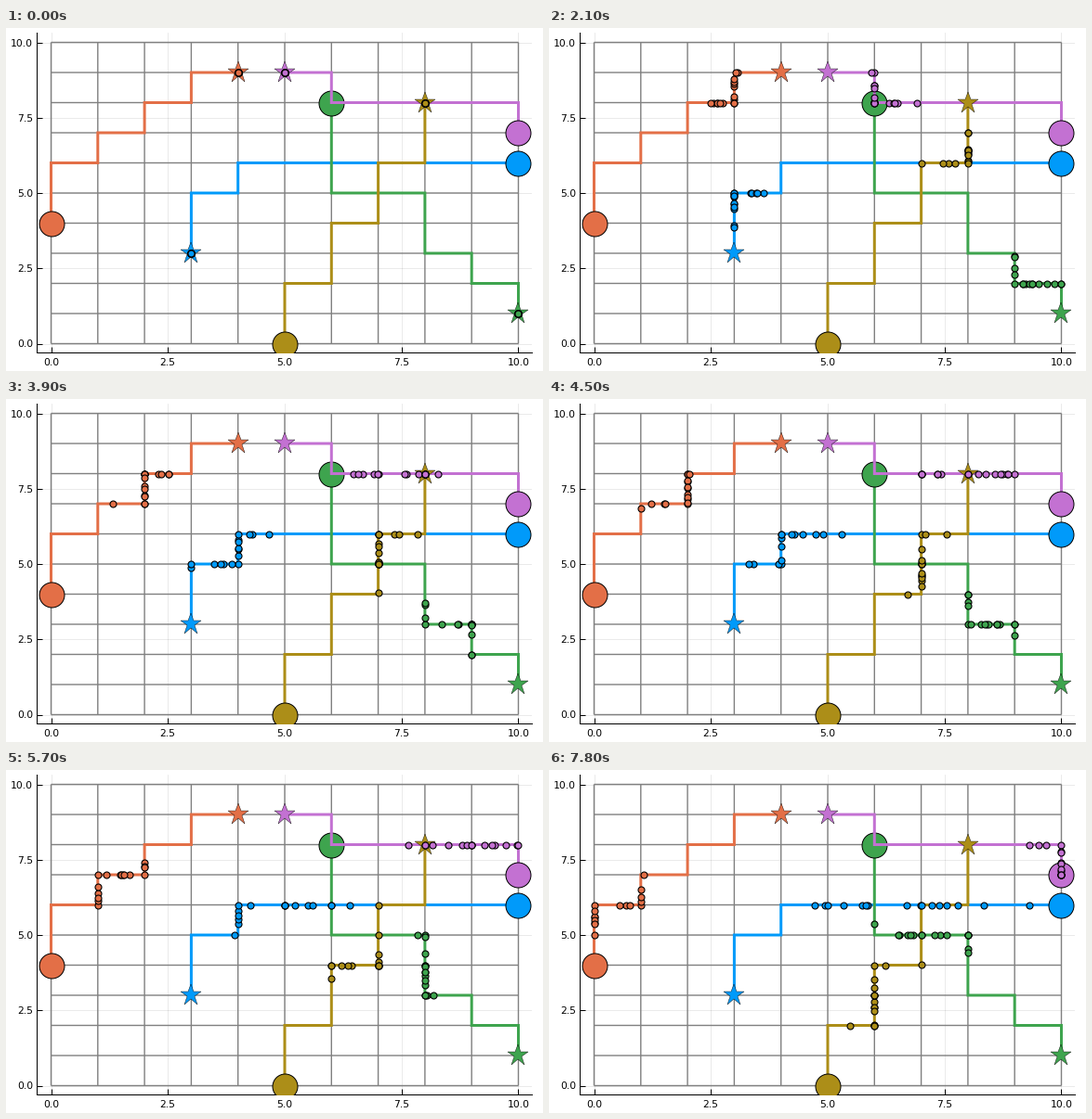
A matplotlib script that plays this animation: 578 px wide and 370 px high, repeating every 8 s.

```python
import numpy as np
import matplotlib.pyplot as plt
from matplotlib.animation import FuncAnimation

WIDTH, HEIGHT, DPI = 578, 370, 64
PX = 72 / DPI  # points per pixel
LEFT, RIGHT, TOP, BOTTOM = 33, 566, 5.25, 350
X0, Y0, DX, DY = 48.5, 340.5, 50.3, 32.5  # pixel place of (0, 0), cell size

AGENTS = 16
SLOWEST, FASTEST = 0.12, 0.55  # cells per step
STEP_MS, TICK_MS, LOOP_MS = 300, 100, 8000

MOVES = {"N": (0, 1), "S": (0, -1), "E": (1, 0), "W": (-1, 0)}
TEAMS = [
    ("#009afa", (3, 3), "NNENEEEEEE"),
    ("#e36f47", (4, 9), "WSWSWSWSS"),
    ("#3ea44e", (10, 1), "NWNWNNWWNNN"),
    ("#c371d2", (5, 9), "ESEEEES"),
    ("#ac8e18", (8, 8), "SSWSSWSSWSS"),
]


class Team:
    """Agents that share a route; each draws a new speed for every cell."""

    def __init__(self, ax, index, color, start, moves):
        self.route = np.cumsum([start] + [MOVES[m] for m in moves], axis=0)
        rng = np.random.default_rng(index)
        self.speeds = rng.uniform(SLOWEST, FASTEST, (AGENTS, len(moves)))
        # A cell takes whole steps: agents stop at the node they reach.
        durations = np.ceil(1 / self.speeds)
        self.departures = np.cumsum(durations, axis=1) - durations

        z = 10 + index
        ax.plot(*self.route.T, color=color, lw=3 * PX, zorder=z, snap=False,
                solid_joinstyle="miter", solid_capstyle="butt")
        self.marker(ax, self.route[0], color, "*", 23.5, 0.4, z)
        self.marker(ax, self.route[-1], color, "o", 27, 1, z)
        self.dots = self.marker(ax, start, color, "o", 7, 1.1, z + 20)

    @staticmethod
    def marker(ax, point, color, shape, size, edge, z):
        return ax.plot([point[0]], [point[1]], shape, ms=size * PX,
                       color=color, mec="black", mew=edge * PX, zorder=z,
                       snap=False)[0]

    def move(self, step):
        progress = np.clip((step - self.departures) * self.speeds, 0, 1)
        walked = progress.sum(axis=1)
        nodes = np.arange(len(self.route))
        self.dots.set_data(*(np.interp(walked, nodes, axis)
                             for axis in self.route.T))
        return self.dots


def draw_stage(fig):
    ax = fig.add_axes([LEFT / WIDTH, 1 - BOTTOM / HEIGHT,
                       (RIGHT - LEFT) / WIDTH, (BOTTOM - TOP) / HEIGHT])
    ax.set_xlim((LEFT - X0) / DX, (RIGHT - X0) / DX)
    ax.set_ylim((Y0 - BOTTOM) / DY, (Y0 - TOP) / DY)
    ax.spines[["top", "right"]].set_visible(False)
    for side in ("left", "bottom"):
        ax.spines[side].set_linewidth(PX)

    ticks = np.linspace(0, 10, 5)
    labels = [f"{t:.1f}" for t in ticks]
    ax.set_xticks(ticks, labels)
    ax.set_yticks(ticks, labels)
    ax.tick_params(direction="in", length=6 * PX, width=PX, pad=4 * PX)
    ax.tick_params(axis="x", pad=5.5 * PX)
    for label in ax.get_xticklabels() + ax.get_yticklabels():
        label.set(fontfamily="DejaVu Sans", fontsize=10.8 * PX)
    ax.set_axisbelow(True)
    ax.grid(color="black", alpha=0.1, lw=0.8 * PX)

    cells = np.arange(11)
    style = dict(color="#808080", lw=1.4 * PX, zorder=3, snap=False)
    ax.hlines(cells, 0, 10, **style)
    ax.vlines(cells, 0, 10, **style)
    return ax


fig = plt.figure(figsize=(WIDTH / DPI, HEIGHT / DPI), dpi=DPI,
                 facecolor="white")
stage = draw_stage(fig)
teams = [Team(stage, i, *team) for i, team in enumerate(TEAMS)]


def update(frame):
    step = frame * TICK_MS // STEP_MS
    return [team.move(step) for team in teams]


animation = FuncAnimation(fig, update, frames=LOOP_MS // TICK_MS,
                          interval=TICK_MS, repeat=True, repeat_delay=0)
plt.show()
```
